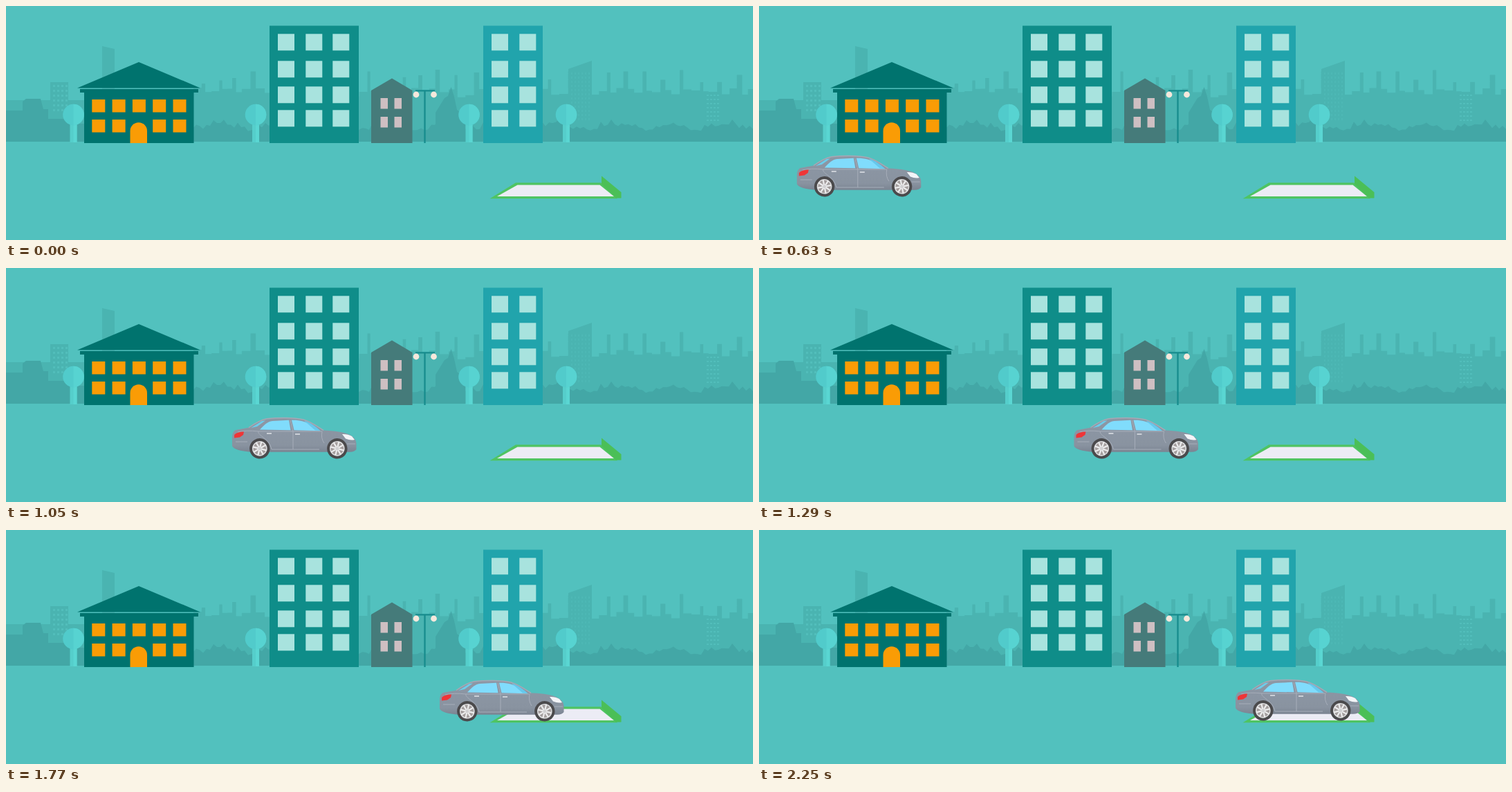
Write an HTML page that moves like this. It is 1080 px wide and 338 px high and loops after 4500 ms.

```html
<!DOCTYPE html>
<html lang="en">
<head>
<meta charset="utf-8">
<title>Parking car</title>
<style>
html, body { margin: 0; width: 100%; height: 100%; overflow: hidden; background: #52c1be; }
svg { display: block; width: 100%; height: 100%; }
</style>
</head>
<body>
<svg viewBox="0 0 1080 338" preserveAspectRatio="none">
  <defs>
    <linearGradient id="paint" x1="0" y1="0" x2="0" y2="1">
      <stop offset="0" stop-color="#8d97a5"/>
      <stop offset=".8" stop-color="#8993a0"/>
      <stop offset="1" stop-color="#7b8492"/>
    </linearGradient>
    <g id="tree">
      <path d="M-5 165h10v32h-10z" fill="#55cecb"/>
      <path d="M0 165h5v32h-5z" fill="#5ad6d2"/>
      <circle cy="157" r="15.3" fill="#51cbcb"/>
      <path d="M0 141.7a15.3 15.3 0 0 1 0 30.6z" fill="#57d3d1"/>
    </g>
    <g id="wheel">
      <circle r="14.7" fill="#4b4a4c"/>
      <circle r="10.8" fill="#dcdcde"/>
      <circle r="9.2" fill="#a39d9d"/>
      <g id="spokes" stroke="#ebebec" stroke-width="2.3"></g>
      <circle r="2.4" fill="#d0d0d2"/>
    </g>
  </defs>

  <rect width="1080" height="338" fill="#52c1be"/>
  <g id="city"></g>
  <rect y="196" width="1080" height="142" fill="#52c1be"/>

  <use href="#tree" x="97.5"/>
  <use href="#tree" x="361"/>
  <use href="#tree" x="669.5"/>
  <use href="#tree" x="810"/>

  <g fill="#00736e">
    <path d="M103 118.500L192 81L281 118.500z"/>
    <path d="M107 120h171v5h-171z"/>
    <path d="M113 122h158.500v76h-158.500z"/>
  </g>
  <path d="M179.500 198V180.500a12.250 12.250 0 0 1 24.500 0V198z" fill="#fa9c05"/>

  <path d="M381 28.500h129V198h-129z" fill="#0f8d89"/>
  <path d="M690 28.500h86V198h-86z" fill="#21a4ac"/>
  <path d="M528 198V122L558 104.500L587.500 122V198z" fill="#457b7a"/>
  <g id="windows"></g>

  <path d="M605.500 198V122M592 122.300h28" fill="none" stroke="#178c8d" stroke-width="2.300"/>
  <g fill="#f6e8dc"><circle cx="593" cy="128" r="4.400"/><circle cx="618.500" cy="128" r="4.400"/></g>

  <path d="M699.500 278.200L737 255.300H860L884 278.200z" fill="#4fc462"/>
  <path d="M710 275L739.500 258.500H858.500L879 275z" fill="#ececf5"/>
  <path d="M861 245.500L889.500 269V277.500H882L861 257z" fill="#4bbf57"/>

  <g id="car">
    <path d="M0 247C0 240 1 236 5 234L24 230.500C32 225 41 219.500 50 217.800C66 215.800 89 215.800 103 219C114 222 123 229 132 234.500C148 235 162 237 169 240.500C177 244.500 179.500 249 179.500 254V262Q177 265.500 170 265.800H28Q3 264 0 257z" fill="url(#paint)"/>
    <path d="M24 230.500C32 225 41 219.500 50 217.800C66 215.800 89 215.800 103 219C114 222 123 229 132 234.500" fill="none" stroke="#a5a9b5" stroke-width="1.500"/>
    <path d="M40 233.500C47 226 51 222 58 221L82 219.800L84.500 234.300z" fill="#80dcfc"/>
    <path d="M86 219.800C98 219.500 106 222 114 226.500L127.500 235.200L89.500 234.300z" fill="#80dcfc"/>
    <path d="M104 220.500C113 223 121 229 127.500 235L120 234.500z" fill="#66c8ec"/>
    <path d="M27 231L36 229L48 220.500L43 221z" fill="#6dcdeb"/>
    <g fill="none" stroke="#a7aeba">
      <path d="M84 220L88 236V262M38 236C36 242 54 246 57 262H126M130 236Q128 246 133 253M8 237Q20 234 38 236H130"/>
      <path d="M5 251H22M166 254H178"/>
    </g>
    <path d="M50 239h7M91 240h7" stroke="#cbd0d7" stroke-width="2"/>
    <path d="M3 241Q7 236.500 17 236.500L16 241L11 244.500L3 245.500z" fill="#ef3537"/>
    <path d="M159 240Q167 239.500 173 243L177 248Q171 249.500 164 246.500z" fill="#f3f5f8"/>
    <g transform="translate(39.800 260.800)"><use href="#wheel" class="wheel"/></g>
    <g transform="translate(151.800 260.800)"><use href="#wheel" class="wheel"/></g>
  </g>
</svg>
<script>
const $ = id => document.getElementById(id);
const range = (start, step, n) => Array.from({ length: n }, (_, i) => start + i * step);
const rect = (x, y, w, h, fill) =>
  `<rect x="${x}" y="${y}" width="${w}" height="${h}" fill="${fill}"/>`;
const grid = (xs, ys, w, h, fill) =>
  ys.map(y => xs.map(x => rect(x, y, w, h, fill)).join('')).join('');

function random(seed) {
  return () => (seed = seed * 16807 % 2147483647) / 2147483647;
}

// Wide low blocks with a slim tower now and then.
function towers(from, to, fill, rnd) {
  let d = `M${from} 198`;
  for (let x = from, i = 0; x < to; i++) {
    const tall = i % 3 === 1;
    const y = tall ? 92 + 22 * rnd() : 118 + 14 * rnd();
    d += `V${y.toFixed(1)}`;
    x = Math.min(to, x + (tall ? 4 + 4 * rnd() : 7 + 6 * rnd()));
    d += `H${x.toFixed(1)}`;
  }
  return `<path d="${d}V198z" fill="${fill}"/>`;
}

function bushes(from, to, fill, rnd) {
  let d = `M${from} 198`;
  for (let x = from; x <= to; x += 5) {
    const y = 175 + 4 * Math.sin(x / 13) - 9 * rnd() ** 2 + 3 * rnd();
    d += `L${x} ${y.toFixed(1)}`;
  }
  return `<path d="${d}V198z" fill="${fill}"/>`;
}

function drawCity() {
  const back = '#4ab4b1', front = '#43a7a6', lit = '#52bebb';
  const rnd = random(29);
  $('city').innerHTML =
    rect(0, 136, 113, 62, back) + rect(64, 110, 26, 88, back) +
    towers(271, 1080, back, rnd) +
    `<path d="M139 130V58L157 62V130zM813 198V91L847 79V198z" fill="${back}"/>` +
    grid(range(68, 6, 4), range(114, 7, 6), 3, 3, lit) +
    grid(range(817, 5, 6), range(96, 6, 12), 2, 3, '#4db8b5') +
    rect(1009, 124, 23, 74, back) +
    grid(range(1013, 5, 4), range(128, 6, 7), 3, 2, lit) +
    `<path d="M0 198V151H24V138L29 134H50L54 149H61V163H88V154H95V170H113V198z" fill="${front}"/>` +
    bushes(270, 1080, front, rnd) +
    `<path d="M621 198V154L634 133L639 130L643.500 117L648 131L652 150L664 160V198z" fill="${front}"/>`;
}

function drawWindows() {
  const orange = '#fa9c05', glass = '#a8e3de';
  const floors = [40.3, 79.3, 116.3, 150.3];
  const cols = range(124.3, 29.3, 5);
  $('windows').innerHTML =
    grid(cols, [135], 19, 18.5, orange) +
    grid(cols.filter((_, i) => i !== 2), [164], 19, 18.5, orange) +
    grid([393, 433.3, 472.3], floors, 24, 24, glass) +
    grid([702, 742.3], floors, 24, 24, glass) +
    grid([541.5, 561.5], [133, 160], 10.5, 15.5, '#cebfc2');
}

function drawSpokes() {
  $('spokes').innerHTML = range(0, 45, 8)
    .map(a => `<path d="M0 0V-10" transform="rotate(${a})"/>`).join('');
}

const LOOP = 4500, STEP = 30, LENGTH = 180, RADIUS = 14.7;
// Front bumper: drives in, cruises, brakes, stops.
const keys = [
  { t: 0, x: -3, v: 0 },
  { t: 600, x: 216, v: .62 },
  { t: 1050, x: 507, v: .6 },
  { t: 1770, x: 807, v: .25 },
  { t: 2250, x: 869, v: 0 }
];

function bumperAt(t) {
  const i = keys.findIndex(k => k.t > t);
  if (i < 0) return keys[keys.length - 1].x;
  const a = keys[i - 1], b = keys[i];
  const h = b.t - a.t, u = (t - a.t) / h, w = 1 - u;
  return a.x + (b.x - a.x) * u * u * (3 - 2 * u) + h * u * w * (w * a.v - u * b.v);
}

const car = $('car'), wheels = document.querySelectorAll('.wheel');

function render(time) {
  const t = Math.floor(time % LOOP / STEP) * STEP;
  const x = bumperAt(t) - LENGTH;
  const dip = t > 1290 && t < 2250 ? Math.sin((t - 1290) / 960 * Math.PI) : 0;
  car.setAttribute('transform', `translate(${x.toFixed(2)} ${dip.toFixed(2)})`);
  const turn = x / RADIUS * 180 / Math.PI;
  wheels.forEach(w => w.setAttribute('transform', `rotate(${turn.toFixed(1)})`));
}

drawCity();
drawWindows();
drawSpokes();

const start = performance.now();
function tick() {
  render(performance.now() - start);
  requestAnimationFrame(tick);
}
tick();
</script>
</body>
</html>
```
